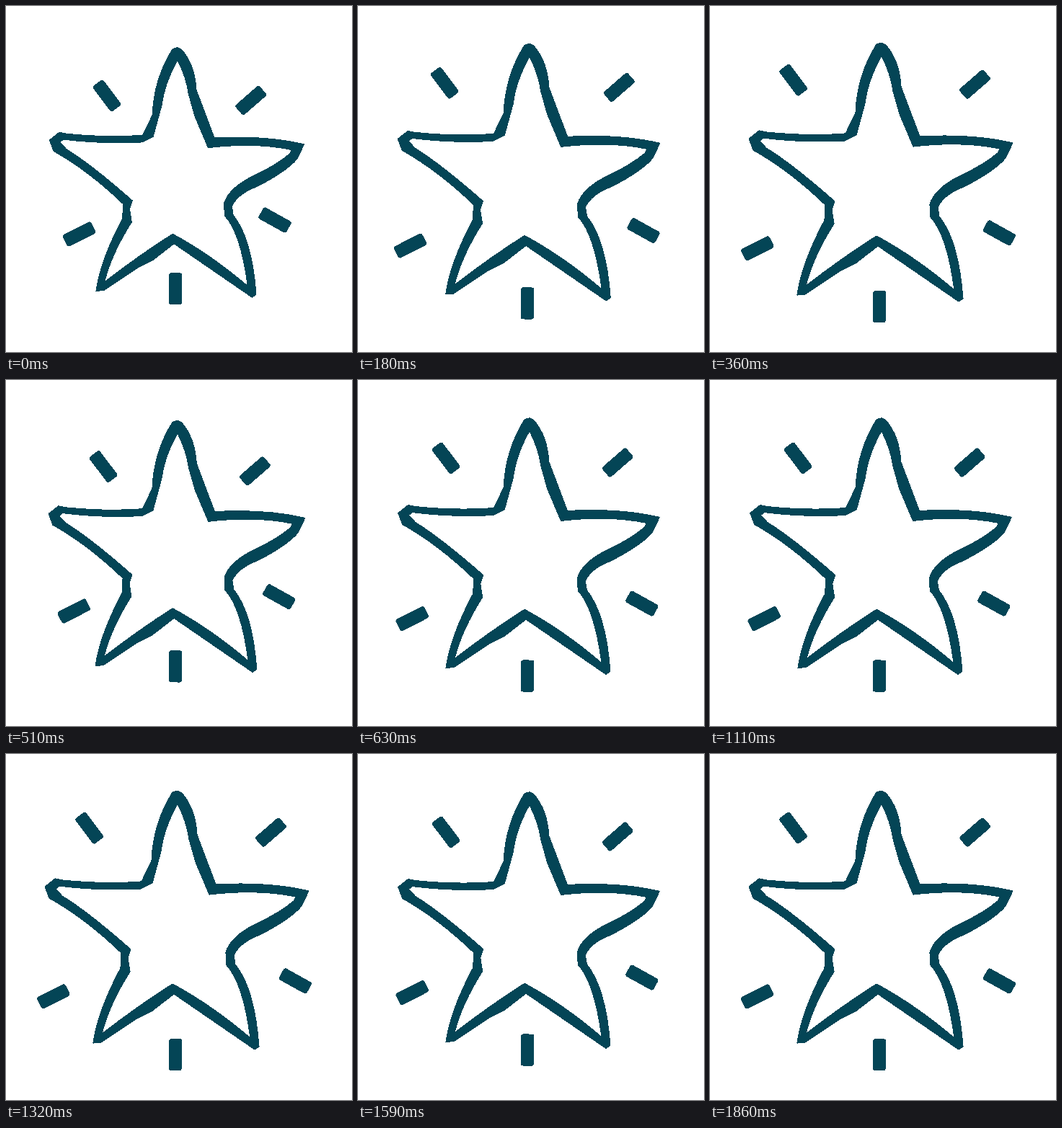
Animation, 480 px wide and 480 px high, one loop 1890 ms. Source, as an HTML page:

```html
<!DOCTYPE html>
<html lang="en">
<head>
<meta charset="utf-8">
<title>Shining star</title>
<style>
  html, body { margin: 0; width: 100%; height: 100%; overflow: hidden; background: #fff; }
  svg {
    display: block; width: 100vw; height: 100vh; shape-rendering: crispEdges;
    fill: #044556; fill-rule: evenodd; stroke: #044556; stroke-width: 1.2; stroke-linejoin: round;
  }
</style>
</head>
<body>
<svg viewBox="0 0 480 480">
  <!-- Outer edge, then inner edge, clockwise from the top point. -->
  <path id="star" d="
    M231 53 L238 51 244 54 Q263 76 265 112 L291 181
    Q365 177 420 190 L410 211 Q395 229 352 251 Q325 261 316 279
    L318 292 Q345 325 351 406 L345 410 233 333
    L202 357 180 368 132 400 121 401 Q127 357 159 297 L160 276
    Q110 228 60 200 L54 184 68 173 78 175 Q138 181 188 177
    L202 148 Q204 96 231 53Z
    M238 69 Q251 95 254 118 L263 150 282 195
    Q350 187 402 198 L399 204 Q380 220 350 234 Q312 252 305 275
    L306 293 Q329 318 339 394 Q285 348 231 319
    Q185 348 133 388 Q143 348 172 302 L169 283 173 271
    Q114 219 78 197 L69 187 74 183 Q130 190 187 187
    L203 179 215 135 Q219 103 238 69Z"/>
</svg>
<script>
const LOOP = 1890, BEAT = 480, STEP = 30;
const CENTER = [236.5, 240], MIN_SCALE = 0.965;
const RAY_LENGTH = 43, RAY_WIDTH = 17;

// Final place and tilt of each ray, and how far it travels outwards.
const rays = [
  { x: 115.5, y: 102.5, tilt: 53, dx: -24.5, dy: -22 },
  { x: 367.7, y: 108.5, tilt: -41, dx: 28, dy: -22.5 },
  { x: 65.5, y: 336.5, tilt: -27, dx: -36, dy: 20 },
  { x: 235, y: 417.3, tilt: 91, dx: 0, dy: 25 },
  { x: 401.5, y: 315, tilt: 29, dx: 28.5, dy: 18 },
];

const svg = document.querySelector("svg");
const star = document.getElementById("star");

for (const ray of rays) {
  ray.node = svg.appendChild(document.createElementNS(svg.namespaceURI, "rect"));
  const shape = { x: -RAY_LENGTH / 2, y: -RAY_WIDTH / 2, width: RAY_LENGTH, height: RAY_WIDTH, rx: 3 };
  for (const name in shape) ray.node.setAttribute(name, shape[name]);
}

const easeOut = t => 1 - (1 - t) ** 3.5;

function draw(now) {
  const time = Math.floor((now % LOOP) / STEP) * STEP;
  const rest = 1 - easeOut((time % BEAT) / BEAT);
  const scale = 1 - (1 - MIN_SCALE) * rest;
  const [left, top] = CENTER.map(c => c * (1 - scale));
  star.setAttribute("transform", `translate(${left} ${top}) scale(${scale})`);
  for (const { node, x, y, tilt, dx, dy } of rays) {
    node.setAttribute("transform", `translate(${x - dx * rest} ${y - dy * rest}) rotate(${tilt})`);
  }
}

const start = performance.now();
function tick() {
  draw(performance.now() - start);
  requestAnimationFrame(tick);
}
tick();
</script>
</body>
</html>
```
